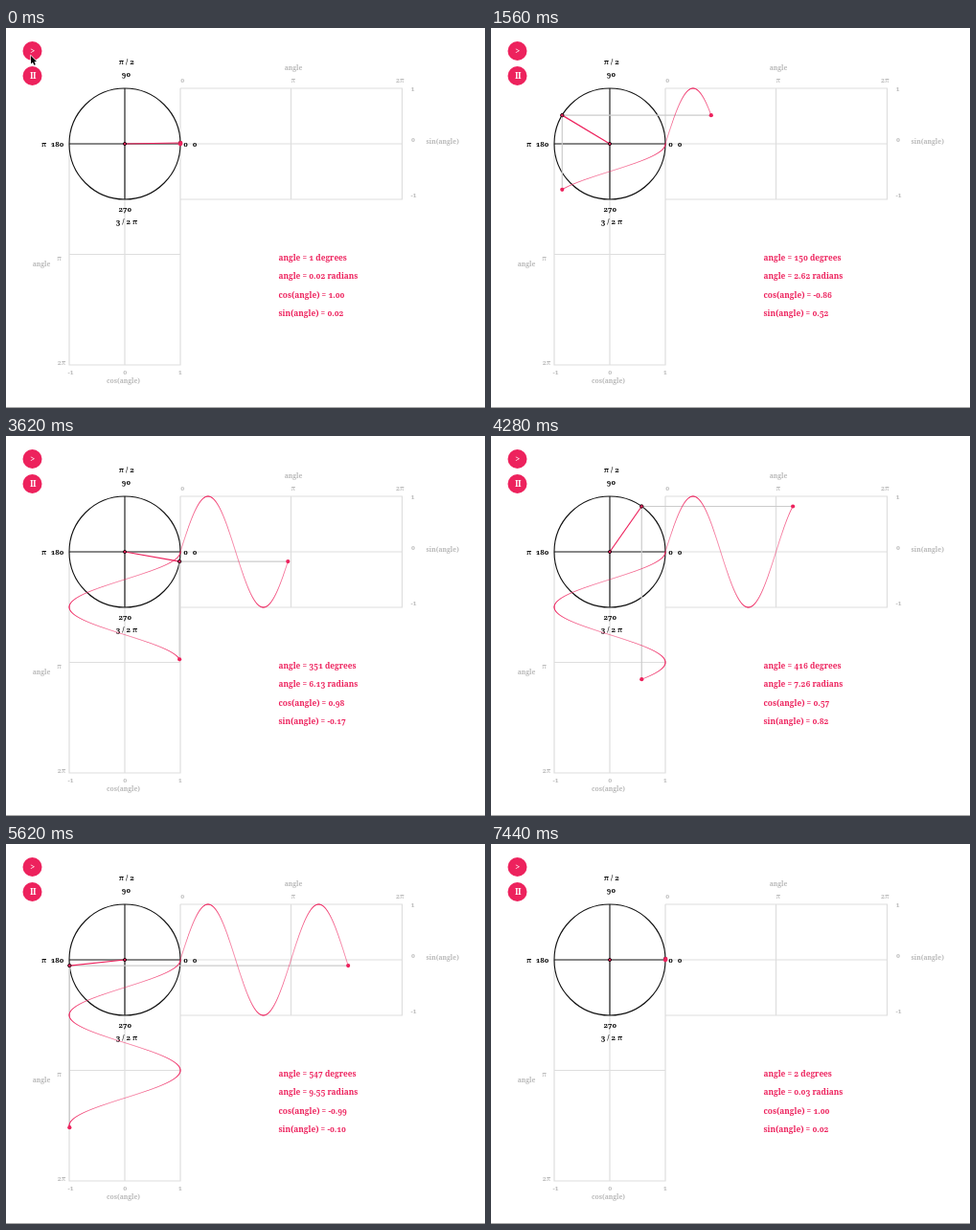
Animation of 500 by 397 pixels, one loop 7460 ms. Source, as an HTML page with a canvas:

```html
<!DOCTYPE html>
<html lang="en">
<head>
<meta charset="utf-8">
<title>Sine and cosine</title>
<style>
  html, body { margin: 0; width: 100%; height: 100%; overflow: hidden; background: #fff; }
  svg, canvas { position: absolute; left: 0; top: 0; width: 500px; height: 397px; display: block; }
  text {
    font: bold 8px Georgia, "Noto Serif", serif;
    font-variant-numeric: oldstyle-nums;
    white-space: pre;
  }
  .grid { stroke: #dedede; stroke-width: 1.2; fill: none; }
  .ink { stroke: #111; stroke-width: 1.1; fill: none; }
  .soft text { font-size: 6.8px; fill: #b9b9b9; }
  .dark text { font-size: 7.8px; fill: #000; }
  .read text { font-size: 8.3px; fill: #ed225d; }
  .button circle { fill: #ed225d; }
  .button text { fill: #fff; font-size: 9px; text-anchor: middle; }
  .mid { text-anchor: middle; }
</style>
</head>
<body>
<svg viewBox="0 0 500 397">
  <path class="grid" d="M182 63H413.5V179H182M182 121H413.5M297.5 63V179M182 63V352H66V121M124 121V352M66 236.5H182"/>
  <path d="M0 396.5H500" stroke="#a8a8a8"/>
  <path class="ink" d="M66 121H182M124 63V179"/>
  <circle class="ink" cx="124" cy="121" r="58"/>
  <g class="button">
    <circle cx="27.5" cy="24" r="10"/><text x="27.7" y="27">&gt;</text>
    <circle cx="27.5" cy="50" r="10"/><text x="27.9" y="53" letter-spacing="-.6">II</text>
  </g>
  <g class="soft" id="soft"></g>
  <g class="dark" id="dark"></g>
  <g class="read" id="read"></g>
</svg>
<canvas id="stage" width="500" height="397"></canvas>
<script>
const LOOP = 7460, STEP = 20;
const CX = 124, CY = 121, R = 58, PER_DEG = 231 / 720;
const PINK = '#ed225d';
const ctx = document.getElementById('stage').getContext('2d');

// time in ms, running angle in degrees
const pace = [[0, 1], [1560, 150], [2720, 264], [3620, 351], [4900, 477], [6360, 618], [7440, 722]];

function label(group, str, x, y, mid) {
  const el = document.createElementNS('http://www.w3.org/2000/svg', 'text');
  el.setAttribute('x', x);
  el.setAttribute('y', y);
  if (mid) el.setAttribute('class', 'mid');
  el.textContent = str;
  document.getElementById(group).appendChild(el);
  return el;
}

[['angle', 300, 44], ['0', 184.3, 57], ['π', 299.7, 57], ['2π', 411.3, 57],
 ['1', 424.5, 66], ['0', 425, 119], ['-1', 425.5, 177], ['sin(angle)', 455.7, 121],
 ['angle', 37, 249], ['π', 55.6, 243], ['2π', 58, 352],
 ['-1', 67.5, 362], ['0', 124.3, 362], ['1', 181.7, 362], ['cos(angle)', 122.5, 371]
].forEach(([s, x, y]) => label('soft', s, x, y, true));

[['π / 2', 125.7, 38], ['90', 125.4, 51], ['π', 39.5, 124], ['180', 53.5, 124],
 ['0', 187.6, 124], ['0', 197, 124], ['270', 124.3, 192], ['3 / 2 π', 126, 205]
].forEach(([s, x, y]) => label('dark', s, x, y, true));

const lines = [243, 262.2, 281.6, 300.6].map(y => label('read', '', 284.5, y));

function angleAt(t) {
  let i = 1;
  while (i < pace.length - 1 && t > pace[i][0]) i++;
  const [t0, a0] = pace[i - 1], [t1, a1] = pace[i];
  return Math.round(a0 + (a1 - a0) * (t - t0) / (t1 - t0));
}

const rad = deg => deg * Math.PI / 180;
const onCircle = deg => [CX + R * Math.cos(rad(deg)), CY - R * Math.sin(rad(deg))];

function dot(x, y, r, outlined) {
  ctx.beginPath();
  ctx.arc(x, y, r, 0, 7);
  ctx.fillStyle = PINK;
  ctx.fill();
  if (outlined) {
    ctx.strokeStyle = '#2a0a14';
    ctx.lineWidth = 1;
    ctx.stroke();
  }
}

function line(x0, y0, x1, y1, color, width) {
  ctx.beginPath();
  ctx.moveTo(x0, y0);
  ctx.lineTo(x1, y1);
  ctx.strokeStyle = color;
  ctx.lineWidth = width;
  ctx.stroke();
}

function trail(last) {
  const s = 0.75;
  ctx.fillStyle = PINK;
  for (let d = 0; d <= last; d++) {
    const [x, y] = onCircle(d), run = d * PER_DEG;
    ctx.fillRect(CX + R + run - s / 2, y - s / 2, s, s);
    ctx.fillRect(x - s / 2, CY + run - s / 2, s, s);
  }
}

function pointer(t) {
  if (t >= 400) return;
  const k = Math.max(0, (t - 100) / 300);
  ctx.save();
  ctx.translate(26 + 2 * k, 29 - 15 * k);
  ctx.beginPath();
  [[0, 0], [0, 8.6], [2, 6.8], [3.3, 9.8], [4.8, 9.2], [3.5, 6.3], [6, 6.1]]
    .forEach(([x, y]) => ctx.lineTo(x, y));
  ctx.closePath();
  ctx.lineWidth = 1.2;
  ctx.strokeStyle = '#fff';
  ctx.stroke();
  ctx.fillStyle = '#000';
  ctx.fill();
  ctx.restore();
}

function draw(ms) {
  const t = Math.floor((ms % LOOP) / STEP) * STEP;
  const total = angleAt(t);
  const wrapped = total > 720;
  const shown = wrapped ? total - 720 : total;
  const deg = Math.max(1, shown - 1);   // the drawing trails the readout by one degree
  const [x, y] = onCircle(deg);
  const run = deg * PER_DEG;

  ctx.clearRect(0, 0, 500, 397);
  line(x, y, CX + R + run, y, '#cbcbcb', 1.2);
  line(x, y, x, CY + run, '#cbcbcb', 1.2);
  trail(deg);
  if (!wrapped) line(CX, CY, x, y, PINK, 1.2);
  dot(CX, CY, 1.6, true);
  dot(x, y, 1.7, true);
  dot(CX + R + run, y, 2.1);
  dot(x, CY + run, 2.1);
  pointer(t);

  [`angle = ${shown} degrees`,
   `angle = ${rad(shown).toFixed(2)} radians`,
   `cos(angle) = ${Math.cos(rad(deg)).toFixed(2)}`,
   `sin(angle) = ${Math.sin(rad(deg)).toFixed(2)}`
  ].forEach((s, i) => { lines[i].textContent = s; });
}

let start = null;
function tick(now) {
  if (start === null) start = now;
  draw(now - start);
  requestAnimationFrame(tick);
}
draw(0);
requestAnimationFrame(tick);
</script>
</body>
</html>
```
